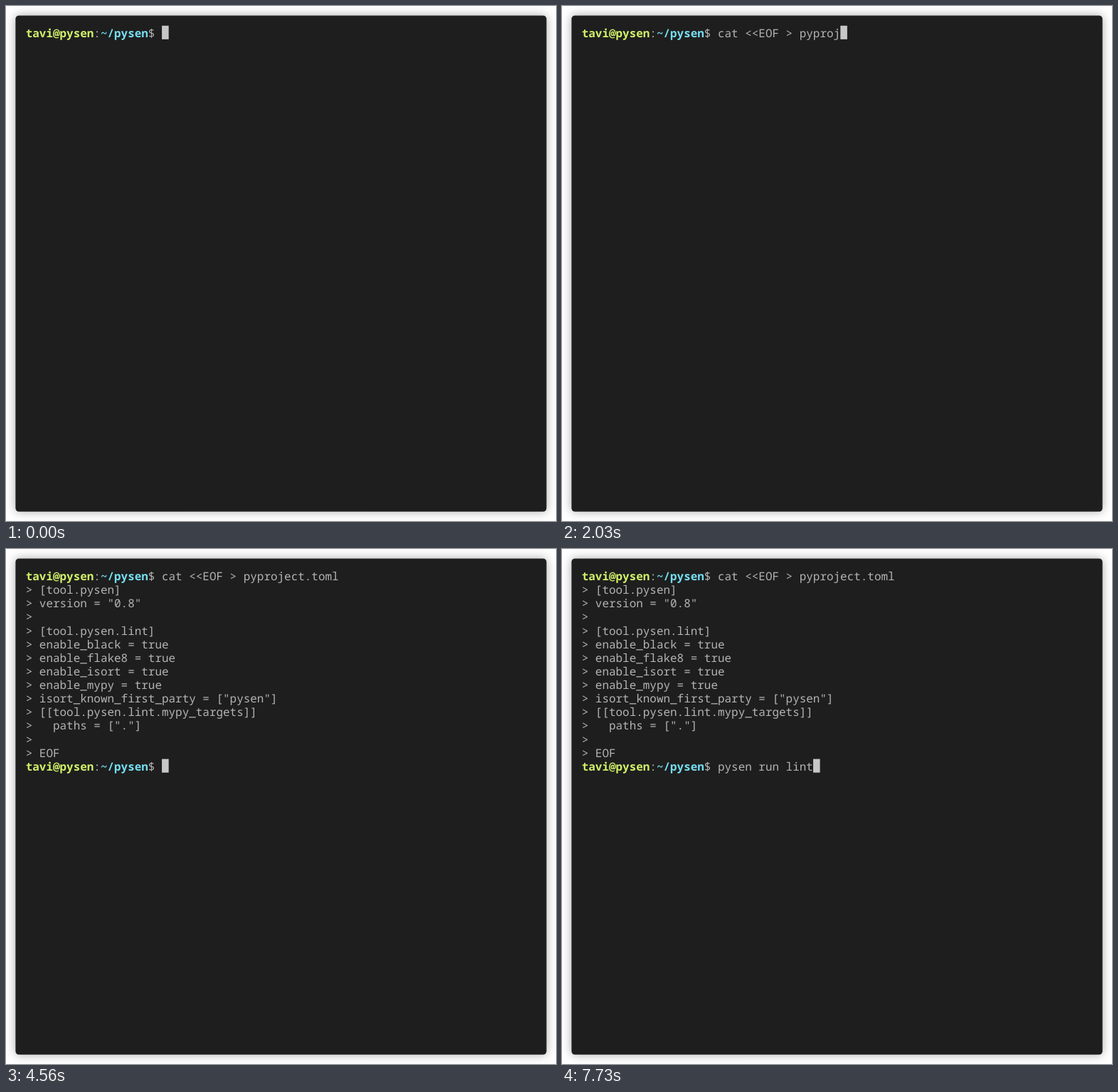
These frames come from a looping animation (773x725 px, 8000 ms). An HTML page:

```html
<!DOCTYPE html>
<html lang="en">
<head>
<meta charset="utf-8">
<title>Terminal</title>
<style>
  html, body { margin: 0; width: 100%; height: 100%; overflow: hidden; background: #fff; }
  /* An 808 x 758 layout of 10 x 20 cells, scaled down to the stage. */
  #stage {
    position: absolute; left: 0; top: 0; width: 808px; height: 758px;
    transform: scale(.9567); transform-origin: 0 0;
  }
  #window {
    position: absolute; left: 14px; top: 14px; width: 780px; height: 730px;
    border-radius: 5px; background: #1e1e1e; box-shadow: 0 0 14px rgba(0, 0, 0, .35);
  }
  pre {
    position: absolute; left: 15px; top: 16px; margin: 0; color: #b4b4b4;
    font: 16.667px/20px "Noto Sans Mono", "DejaVu Sans Mono", monospace;
    text-rendering: geometricPrecision; font-variant-ligatures: none;
  }
  b { color: #d1f169; }
  b + b { color: #75dff2; }
  #cursor {
    position: relative; top: -1px; display: inline-block; width: 10px; height: 20px;
    vertical-align: top; background: #c7c7c7;
  }
</style>
</head>
<body>
<div id="stage"><div id="window"><pre><span class="prompt"></span><span id="command"></span><span id="body"></span><span class="prompt" id="next"></span><span id="run"></span><span id="cursor"></span></pre></div></div>
<script>
const LOOP = 8000, KEY = 90;
const config = `[tool.pysen]
version = "0.8"

[tool.pysen.lint]
enable_black = true
enable_flake8 = true
enable_isort = true
enable_mypy = true
isort_known_first_party = ["pysen"]
[[tool.pysen.lint.mypy_targets]]
  paths = ["."]
`.split("\n").map(line => "\n> " + line).join("");

const $ = id => document.getElementById(id);
for (const p of document.querySelectorAll(".prompt"))
  p.innerHTML = "<b>tavi@pysen</b>:<b>~/pysen</b>$ ";

// The part of text typed by time t, one key at a time from start.
const typed = (text, start, t) =>
  text.slice(0, Math.max(0, Math.floor((t - start) / KEY) + 1));

function heredoc(t) {
  if (t < 2840) return "";
  if (t < 3420) return "\n> ";
  if (t < 3510) return config;
  return config + "\n> " + typed("EOF", 3900, t) + (t < 4490 ? "" : "\n");
}

function show(id, text) {
  if ($(id).textContent !== text) $(id).textContent = text;
}

function draw(now) {
  const t = now % LOOP;
  show("command", typed("cat <<EOF > pyproject.toml", 500, t));
  show("body", heredoc(t));
  $("next").hidden = t < 4560;
  show("run", typed("pysen run lint", 6560, t));
}

const start = performance.now();
function tick() {
  draw(performance.now() - start);
  requestAnimationFrame(tick);
}
tick();
</script>
</body>
</html>
```
